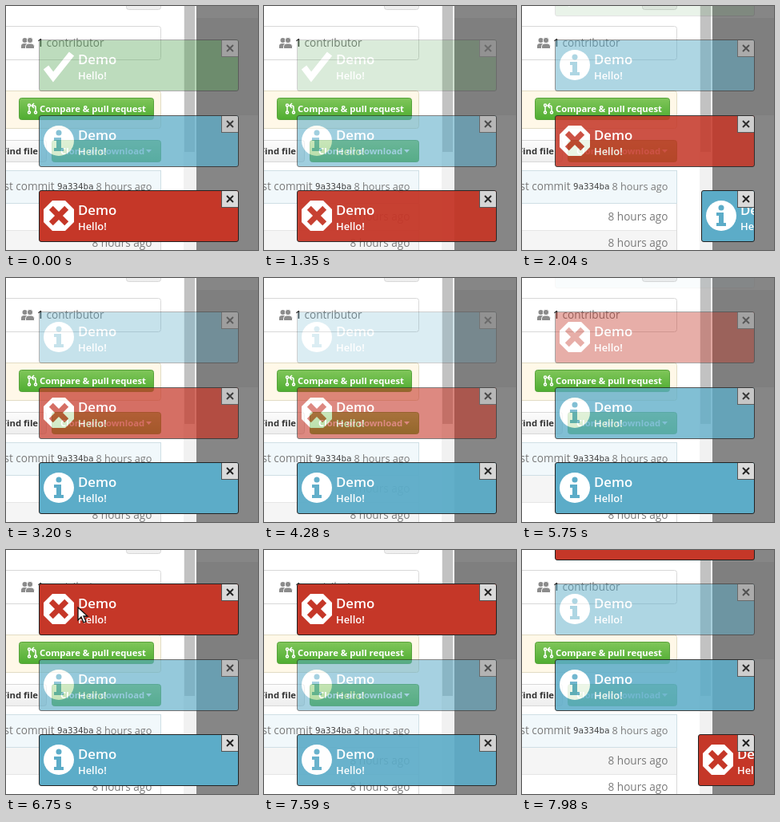
An HTML page that plays this animation: 315x306 px, repeating every 8 s.

```html
<!DOCTYPE html>
<html lang="en">
<head>
<meta charset="utf-8">
<title>Stacked notifications</title>
<style>
  html, body { margin: 0; width: 100%; height: 100%; overflow: hidden; background: #fff; }
  body { position: relative; }
  svg { display: block; position: absolute; left: 0; top: 0; }
  text { font-family: "Open Sans", "Noto Sans", sans-serif; }
  .label { font-size: 11.3px; font-weight: 700; }
  .muted { font-size: 13.6px; fill: #7a7a7a; }
  .toast {
    position: absolute; box-sizing: border-box; right: 24px; height: 65px;
    border: 1px solid #222; border-radius: 3px; overflow: hidden;
  }
  .toast .content { left: -1px; top: -1px; }
  .close {
    position: absolute; box-sizing: border-box; right: 0; top: 0; width: 21px; height: 21px;
    background: #dadada; border: solid #555; border-width: 0 0 1px 1px;
  }
  #stage { position: absolute; left: 0; top: 0; width: 315px; height: 306px; overflow: hidden; }
</style>
</head>
<body>
<div id="stage">
  <svg width="315" height="306">
    <defs>
      <linearGradient id="green" x2="0" y2="1">
        <stop stop-color="#80c65a"/><stop offset="1" stop-color="#4fad31"/>
      </linearGradient>
      <linearGradient id="plain" x2="0" y2="1">
        <stop stop-color="#fcfcfc"/><stop offset="1" stop-color="#eee"/>
      </linearGradient>
    </defs>
    <rect width="315" height="306" fill="#fff"/>

    <!-- dimmed area and scrollbar -->
    <rect x="222" width="16" height="306" fill="#f1f1f1"/>
    <rect x="223" width="13" height="183" fill="#c2c2c2"/>
    <rect x="238" width="77" height="306" fill="#868686"/>
    <rect x="238" y="15" width="77" height="122" fill="#7f7f7f"/>

    <!-- page -->
    <g stroke="#d8d8d8">
      <rect x="150.5" y="-20.5" width="43" height="25" rx="3" fill="url(#plain)"/>
      <rect x="-9.5" y="25.5" width="203" height="42" rx="3" fill="#fff"/>
      <rect x="-9.5" y="106.5" width="203" height="47" rx="3" fill="#fff8e8" stroke="#e2dcc4"/>
      <rect x="-20.5" y="168.5" width="71" height="27" rx="3" fill="url(#plain)"/>
      <rect x="-9.5" y="206.5" width="203" height="140" rx="3" fill="#fff"/>
      <rect x="-9.5" y="206.5" width="203" height="41" fill="#f1f8fb" stroke="#cfdfe5"/>
    </g>
    <rect id="row1" y="248" width="193" height="33"/>
    <rect id="row2" y="281" width="193" height="33"/>
    <path d="M0 281.5H193" stroke="#e6e6e6"/>

    <g fill="#8c8c8c">
      <circle cx="23.5" cy="43" r="3"/><path d="M19 53v-3q0-3 4-3h2q3 0 3 3v3z"/>
      <g stroke="#fff"><circle cx="30" cy="43" r="3.7"/><path d="M24.5 53.5v-3q0-3.5 4-3.5h3q4 0 4 3.5v3z"/></g>
    </g>
    <text x="39" y="51" class="muted" style="font-weight:600;fill:#333">1</text>
    <text x="50.5" y="51" class="muted">contributor</text>

    <g fill="url(#green)" stroke="#57a33c">
      <rect x="16.5" y="115.5" width="168" height="27" rx="3"/>
      <rect x="57.5" y="168.5" width="136" height="27" rx="3"/>
    </g>
    <g fill="none" stroke="#fff" stroke-width="1.5">
      <circle cx="29" cy="124.5" r="1.5"/><circle cx="29" cy="133.5" r="1.5"/>
      <circle cx="37" cy="133.5" r="1.5"/>
      <path d="M29 126v6M37 132v-5q0-2-2-2h-2M35 122l-3 3 3 3"/>
    </g>
    <text x="42" y="133" class="label" fill="#fff">Compare &amp; pull request</text>
    <text x="40" y="186" class="label" fill="#333" text-anchor="end">Find file</text>
    <text x="68" y="186" class="label" fill="#fff">Clone or download</text>
    <path d="M175 180h7l-3.5 4z" fill="#fff"/>

    <text x="60.5" y="231" class="muted" text-anchor="end">Latest commit</text>
    <text x="64" y="230" fill="#444" style="font:10.8px 'DejaVu Sans Mono',monospace">9a334ba</text>
    <text x="182.5" y="231" class="muted" text-anchor="end" style="font-size:12.7px">8 hours ago</text>
    <text x="182.5" y="269" class="muted" text-anchor="end">8 hours ago</text>
    <text x="182.5" y="302" class="muted" text-anchor="end">8 hours ago</text>
  </svg>
  <div id="toasts"></div>
  <svg id="cursor" width="16" height="24">
    <path d="M1 1v16l4-4 3 7 3-1.3-3-6.7h5z" fill="#fff" stroke="#111" stroke-width="1.3"/>
  </svg>
</div>
<script>
const LOOP = 8000, PERIOD = 2966, FIRST_BORN = -6992;
const LIFE = 10000, FADE = 8000, SLIDE = 500;
const WIDTH = 250, BOTTOM_SLOT = 231, SLOT_GAP = 94.5;
const HOVERED = 2, HOVER_START = 6150;

const kinds = {
  success: { color: '#51a351', icon: () =>
    '<path d="M9 35l9 12L41 18" fill="none" stroke="#fff" stroke-width="8"/>' },
  info: { color: '#5cacc8', icon: color =>
    `<circle cx="25" cy="32" r="19" fill="#fff"/><circle cx="25" cy="22" r="3.5" fill="${color}"/>
     <path d="M19 28h9v13h3v4H19v-4h3v-9h-3z" fill="${color}"/>` },
  error: { color: '#c53728', icon: color =>
    `<path d="M17 13h16l11 11v16l-11 11H17L6 40V24z" fill="#fff"/>
     <path d="M15.3 22.3l19.4 19.4m0-19.4L15.3 41.7" stroke="${color}" stroke-width="7"/>` }
};

const $ = id => document.getElementById(id);
const clamp = v => Math.max(0, Math.min(1, v));

const toasts = ['success', 'info', 'error', 'info', 'info', 'error'].map((name, i) => {
  const { color, icon } = kinds[name];
  const el = document.createElement('div');
  el.className = 'toast';
  el.style.background = color;
  el.innerHTML = `
    <svg class="content" width="250" height="65">${icon(color)}
      <g fill="#fff" font-weight="600"><text x="49" y="31" font-size="16.8">Demo</text>
      <text x="49" y="50" font-size="12.9">Hello!</text></g>
    </svg>
    <div class="close"><svg width="20" height="20">
      <path d="M6 6l8 8m0-8l-8 8" stroke="#222" stroke-width="2"/></svg></div>`;
  $('toasts').append(el);
  return { el, born: FIRST_BORN + i * PERIOD };
});

function drawToasts(t) {
  const newest = toasts.filter(toast => toast.born <= t).length - 1;
  toasts.forEach(({ el, born }, i) => {
    const age = t - born;
    const held = i === HOVERED && t >= HOVER_START;
    el.style.display = age > 0 && (held || age < LIFE) ? '' : 'none';
    el.style.top = Math.round(BOTTOM_SLOT - SLOT_GAP * (newest - i)) + 'px';
    el.style.width = WIDTH * clamp(age / SLIDE) + 'px';
    el.style.opacity = held ? 1 : clamp((LIFE - age) / FADE);
  });
}

function drawCursor(t) {
  const enter = clamp((t - 6050) / 250), leave = clamp((t - 7350) / 200);
  const x = 11 + 79 * enter - 53 * leave;
  $('cursor').style.display = t >= 6050 && t < 7550 ? '' : 'none';
  $('cursor').style.transform = `translate(${x - 1}px, ${74 - 3 * enter}px)`;
}

function draw(now) {
  const t = now % LOOP;
  const upperRow = t >= 4600;
  $('row1').setAttribute('fill', upperRow ? '#f5f5f5' : '#fff');
  $('row2').setAttribute('fill', upperRow ? '#fff' : '#f5f5f5');
  drawToasts(t);
  drawCursor(t);
}

const start = performance.now();
function tick() {
  draw(performance.now() - start);
  requestAnimationFrame(tick);
}
tick();
</script>
</body>
</html>
```
